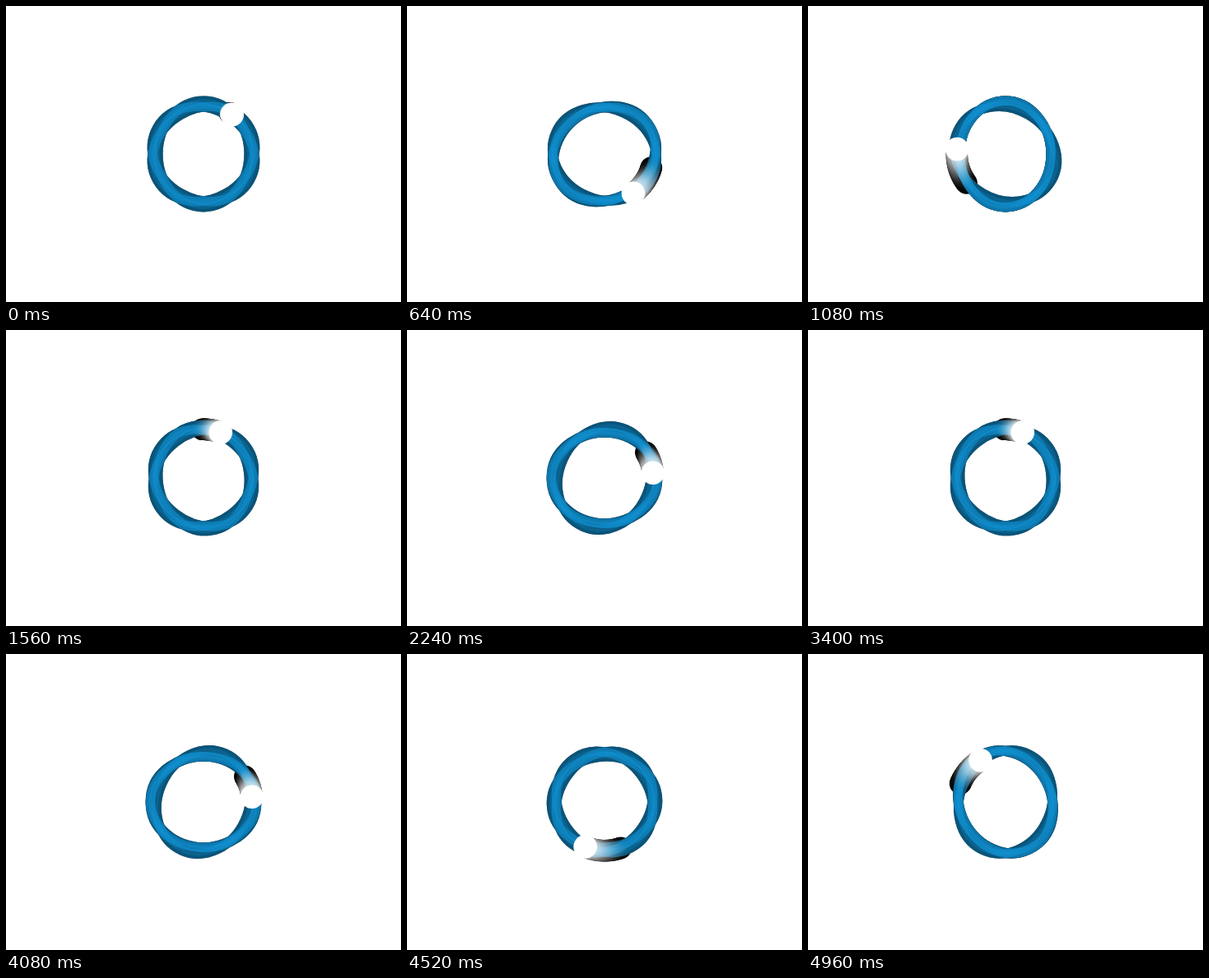
These frames come from a looping animation (480x360 px, 5 s). An HTML page with a canvas:

```html
<!DOCTYPE html>
<html lang="en">
<head>
<meta charset="utf-8">
<title>Ring loader</title>
<style>
html, body { margin: 0; width: 100%; height: 100%; overflow: hidden; background: #fff; }
canvas { display: block; }
</style>
</head>
<body>
<canvas id="stage" width="480" height="360"></canvas>
<script>
const ctx = document.getElementById('stage').getContext('2d');
const TAU = Math.PI * 2;
const RAD = Math.PI / 180;
const CX = 240, CY = 180;
const LOOP = 5000, STEP = 40, TURN = 1840;
const ORBIT = 59.2, BALL = 14.3, REST_ANGLE = -54.5;
const TAIL_MS = 175, TAIL_COUNT = 32;
const RING_WIDTH = 11.4, CORE_WIDTH = 4;

// Each ring makes half a turn while the ball makes a full one.
const rings = [
  { axis: 30, spin: -180 },
  { axis: 90, spin: 180 },
  { axis: 150, spin: 180 }
];

// Sine ease in and out over each turn, 0 to 1.
function progress(ms) {
  const phase = (((ms + STEP) % TURN) + TURN) % TURN / TURN;
  return (1 - Math.cos(Math.PI * phase)) / 2;
}

function strokeRing(ring, p, color, width = RING_WIDTH) {
  ctx.beginPath();
  ctx.ellipse(CX, CY, 64.7, 55.1, (ring.axis + ring.spin * p) * RAD, 0, TAU);
  ctx.strokeStyle = color;
  ctx.lineWidth = width;
  ctx.stroke();
}

function fillBall(ms, color, radius = BALL) {
  const angle = (REST_ANGLE + 360 * progress(ms)) * RAD;
  ctx.beginPath();
  ctx.arc(CX + ORBIT * Math.cos(angle), CY + ORBIT * Math.sin(angle), radius, 0, TAU);
  ctx.fillStyle = color;
  ctx.fill();
}

function draw(ms) {
  const p = progress(ms);
  ctx.fillStyle = '#fff';
  ctx.fillRect(0, 0, 480, 360);

  // Dark base lets overlapping translucent layers grow brighter.
  for (const ring of rings) strokeRing(ring, p, '#000');
  for (let i = Math.round(TAIL_COUNT * 0.8); i > 0; i--) {
    fillBall(ms - TAIL_MS * i / TAIL_COUNT, '#000', BALL - 1);
  }

  for (const ring of rings) {
    strokeRing(ring, p, 'rgba(16,146,210,0.58)');
    strokeRing(ring, p, 'rgba(20,155,220,0.2)', CORE_WIDTH);
  }
  for (let i = TAIL_COUNT; i > 0; i--) {
    const fade = 1 - i / TAIL_COUNT;
    fillBall(ms - TAIL_MS * i / TAIL_COUNT, `rgba(255,255,255,${0.14 * fade * fade})`);
  }
  fillBall(ms, '#fff');
}

const start = performance.now();
function tick() {
  const ms = (performance.now() - start) % LOOP;
  draw(Math.floor(ms / STEP) * STEP);
  requestAnimationFrame(tick);
}
tick();
</script>
</body>
</html>
```
